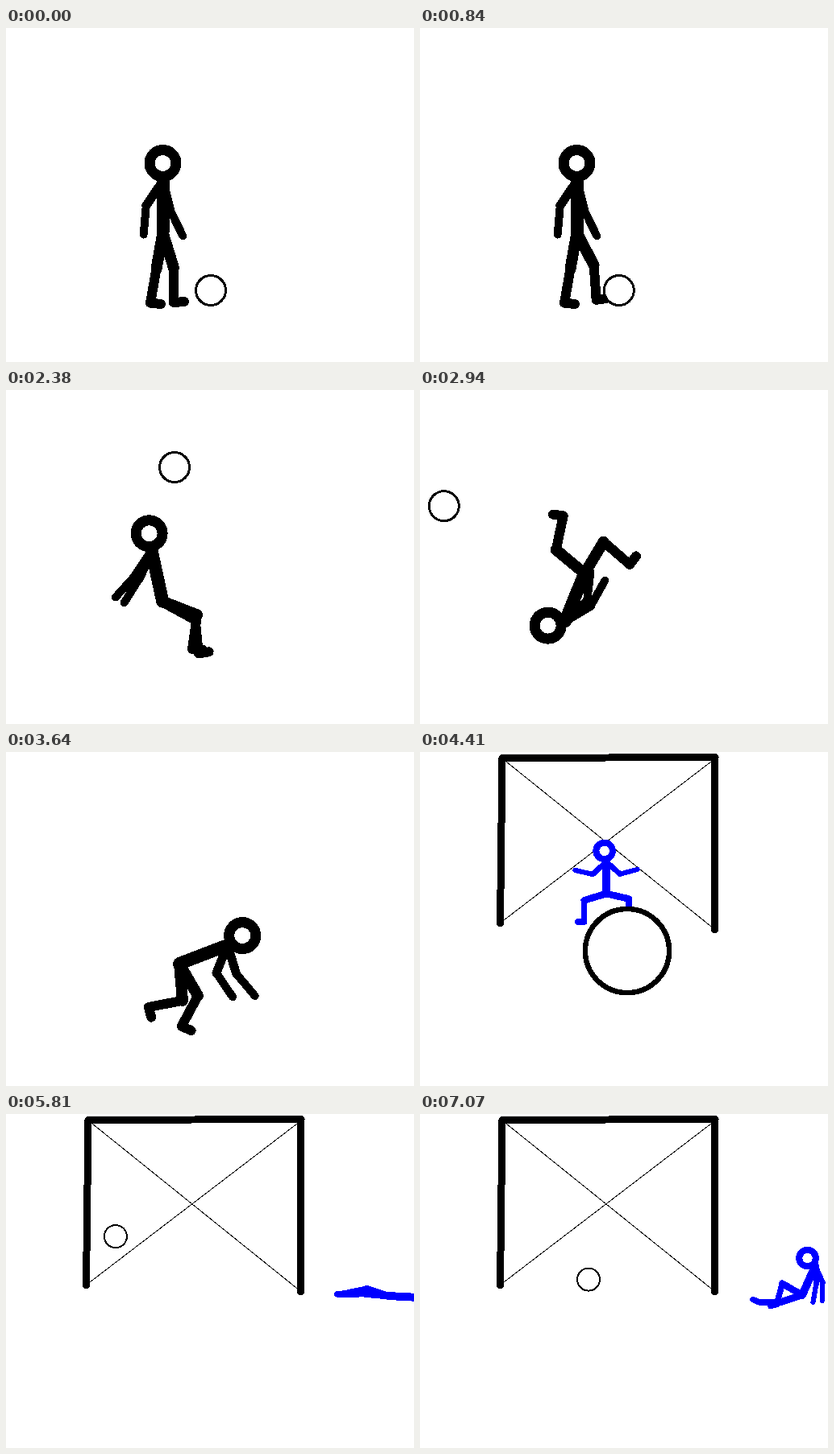
An HTML page for the animation above (7280 ms loop, 506x415 px).

```html
<!DOCTYPE html>
<html lang="en">
<head>
<meta charset="utf-8">
<title>Free kick</title>
<style>
  html, body { margin: 0; width: 100%; height: 100%; overflow: hidden; background: #fff; }
  svg { display: block; fill: none; stroke-linecap: round; stroke-linejoin: round; }
</style>
</head>
<body>
<svg id="stage" width="506" height="415" shape-rendering="crispEdges"></svg>
<script>
const stage = document.getElementById('stage');
const STEP = 70, LOOP = 7280, CUT = 54;

// Poses: hip position and bone angles in degrees (0 right, 90 down).
// Arms and legs list upper and lower bone of each side; feet turn from the shin.
const stand = { hip: [194.5, 254], torso: -90, head: -90,
  arms: [124, 95, 76, 64], legs: [100, 100, 73, 90], feet: [-94, -94] };
const reach = { ...stand, legs: [100, 100, 12, 63] };
const scoop = { ...stand, legs: [100, 100, 47, 80] };
const watch = { ...stand, hip: [204, 254], torso: -88, head: -88,
  arms: [133, 101, 100, 68], legs: [100, 114, 73, 90] };
const crouch = { ...stand, hip: [192, 272], torso: -78, head: -75,
  arms: [135, 150, 130, 140], legs: [50, 130, 30, 115] };
const strike = { ...stand, hip: [203, 225], torso: -199, head: -190,
  arms: [80, 60, 50, 50], legs: [-57, -98, -13, 30] };
const inverted = { ...stand, hip: [204, 228], torso: -248, head: -194,
  arms: [-31, -61, -43, -83], legs: [-140, -78, -59, 41] };
const land = { ...stand, hip: [215, 263], torso: -381, head: -393,
  arms: [-248, -304, -287, -310], legs: [-275, -191, -300, -242] };

const ready = { hip: [231, 176], torso: -90, head: -100,
  arms: [137, 193, 42, -15], legs: [163, 90, 13, 90], feet: [90, -90] };
const leap = { ...ready, hip: [302, 70], torso: -36, head: -40,
  arms: [308, 305, -38, -38], legs: [135, 125, 110, 130] };
const soar = { ...leap, hip: [400, 95], torso: -10, head: -10 };
const flat = { hip: [474, 226], torso: 3, head: 3,
  arms: [360, 360, 0, 0], legs: [198, 168, 185, 178], feet: [5, 5] };
const sit = { hip: [474, 225], torso: -66, head: -135,
  arms: [426, 452, 87, 100], legs: [210, 105, 162, 180], feet: [60, 25] };

const kickerTrack = [[0, stand], [5, reach], [10, stand], [15, scoop], [24, watch],
  [33, crouch], [38, strike], [42, inverted], [49, land]];
const keeperTrack = [[64, ready], [72, leap], [77, soar], [82, flat], [87, flat], [99, sit]];

const mix = (a, b, k) => Array.isArray(a) ? a.map((v, i) => mix(v, b[i], k)) : a + (b - a) * k;

function poseAt(track, n) {
  const i = track.findIndex(key => key[0] > n);
  if (i < 0) return track[track.length - 1][1];
  if (i === 0) return track[0][1];
  const [n0, a] = track[i - 1], [n1, b] = track[i];
  const pose = {};
  for (const part in a) pose[part] = mix(a[part], b[part], (n - n0) / (n1 - n0));
  return pose;
}

const line = (width, ...points) => `<path d="M${points.join('L')}" stroke-width="${width}"/>`;
const ring = (x, y, r, width) =>
  `<circle cx="${x}" cy="${y}" r="${r}" stroke-width="${width}" fill="#fff"/>`;

function figure(pose, color, scale) {
  const { hip, torso, head, arms, legs, feet } = pose;
  const end = ([x, y], angle, length) => {
    const a = angle * Math.PI / 180;
    return [x + Math.cos(a) * length * scale, y + Math.sin(a) * length * scale];
  };
  const bone = (width, a, b) => line(width * scale, a, b);
  const neck = end(hip, torso, 64);
  let parts = bone(16, hip, neck);
  for (const side of [0, 1]) {
    const [upper, fore] = arms.slice(side * 2), [thigh, shin] = legs.slice(side * 2);
    const elbow = end(neck, upper, 37), hand = end(elbow, fore, 36);
    const knee = end(hip, thigh, 46), ankle = end(knee, shin, 43);
    const toe = end(ankle, shin + feet[side], 13);
    parts += bone(11, neck, elbow) + bone(10, elbow, hand)
      + bone(14, hip, knee) + bone(12, knee, ankle) + bone(12, ankle, toe);
  }
  parts += ring(...end(neck, head, 22), 16.5 * scale, 13 * scale);
  return `<g stroke="${color}">${parts}</g>`;
}

function juggledBall(n) {
  if (n < 15) return [254 - 0.6 * n, 326];
  if (n < 38) return [228 - 1.9 * (n - 24), 66 + 1.25 * (n - 29.1) ** 2];
  return [201 - 42.8 * (n - 38), 165 - 5.2 * (n - 38)];
}

// Curling shot that shrinks with distance, then drops and rolls away from the net
function shotBall(n) {
  if (n < 84) {
    const m = n - 61, far = (n - 63) / 20;
    const r = 1 / (0.0192 + 0.0522 * far);
    const arc = far > 0 ? 25 * far * far - 30 * Math.sin(Math.PI * far) : 0;
    return [242 + 8.73 * m - 0.616 * m * m, 83 + 3.15 * r + arc, r];
  }
  const m = n - 84;
  const bounce = 47 * Math.exp(-m / 4) * Math.abs(Math.cos(m * Math.PI / 10));
  return [209 - 90 * Math.max(0, 1 - m / 17) ** 1.8, 206 - bounce, 14];
}

function kickScene(n) {
  return figure(poseAt(kickerTrack, n), '#000', 1) + ring(...juggledBall(n), 18.5, 3);
}

function goalScene(n) {
  const pose = { ...poseAt(keeperTrack, n) };
  if (n < 63) pose.hip = [231, 172 + 4 * Math.cos((n - 63) * Math.PI / 3)];
  let scene = line(1, [102, 8], [365, 220]) + line(1, [365, 9], [100, 212])
    + line(9, [99.5, 213], [102, 7.5], [366, 6.5], [365.5, 221])
    + figure(pose, '#00f', 0.62);
  if (n >= 59) {
    const [x, y, r] = shotBall(n);
    scene += ring(x, y, r, Math.max(2, r / 8));
  }
  return scene;
}

function draw(now) {
  let n = Math.min(101, Math.floor(now % LOOP / STEP));
  if (n === 50 || n === 100) n--; // brief holds
  stage.innerHTML = `<g stroke="#000">${n < CUT ? kickScene(n) : goalScene(n)}</g>`;
}

let start;
function tick(now) {
  start ??= now;
  draw(now - start);
  requestAnimationFrame(tick);
}
requestAnimationFrame(tick);
</script>
</body>
</html>
```
